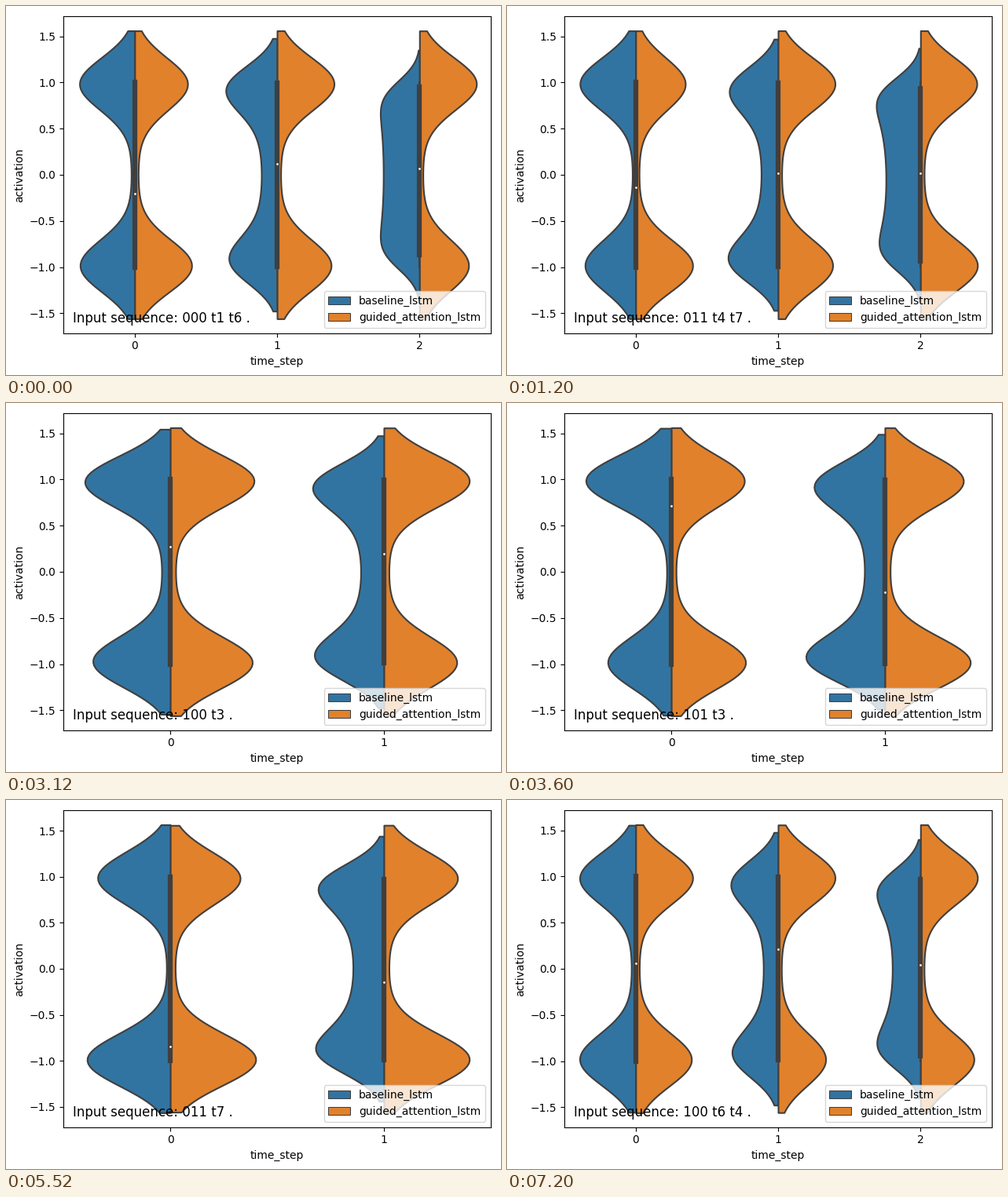
Write a matplotlib script that moves like this. It is 630 px wide and 470 px high and loops after 8 s.

```python
import numpy as np
import matplotlib.pyplot as plt
from matplotlib.animation import FuncAnimation
from matplotlib.patches import Patch

WIDTH, HEIGHT, DPI = 630, 470, 100
LEFT, RIGHT, TOP, BOTTOM = 73.2, 616.9, 13.2, 416.75
BLUE, ORANGE, GRAY = "#3274a1", "#e1812c", "#3f3f3f"
LINE = 1.5
FRAME_MS, SCENE_MS, LOOP_MS = 400, 1200, 8000
UNITS = 480
GUIDED_GAIN = 6.8

# Each time step: baseline gain, baseline tilt, guided tilt.
SCENES = [
    ("000 t1 t6", [(6.8, 0.01, -0.07), (1.4, 0.05, 0.05), (0.55, 0, 0.14)]),
    ("011 t4 t7", [(6.8, 0.09, -0.13), (1.3, -0.02, 0.04), (0.62, 0.05, -0.01)]),
    ("100 t3", [(4, 0.09, 0.02), (1.35, 0.02, 0.15)]),
    ("101 t3", [(6.8, 0.28, -0.015), (1.6, -0.09, -0.08)]),
    ("011 t7", [(9, -0.13, -0.19), (1, -0.03, -0.14)]),
    ("010 t8", [(6.8, -0.03, 0.045), (1, 0, 0.04)]),
    ("100 t6 t4", [(5.5, 0, 0.02), (1.4, 0.02, 0.17), (0.75, 0, 0.06)]),
]


def activations(gain, tilt):
    """Tanh outputs of logistic inputs; a high gain saturates them at -1 and 1."""
    u = (np.arange(UNITS) + 0.5) / UNITS
    return np.tanh(gain * (np.log(u / (1 - u)) + tilt))


def density(data):
    """Gaussian kernel estimate, cut two bandwidths beyond the data."""
    bandwidth = data.std(ddof=1) * len(data) ** -0.2
    y = np.linspace(data.min() - 2 * bandwidth, data.max() + 2 * bandwidth, 100)
    kernels = np.exp(-0.5 * ((y[:, None] - data) / bandwidth) ** 2)
    return y, kernels.mean(axis=1) / bandwidth


def draw_violin(x, base, guided):
    curves = [density(base), density(guided)]
    peak = max(width.max() for _, width in curves)
    for (y, width), side, color in zip(curves, (-1, 1), (BLUE, ORANGE)):
        ax.fill_betweenx(y, x, x + side * 0.4 * width / peak,
                         facecolor=color, edgecolor=GRAY, linewidth=LINE)

    both = np.concatenate([base, guided])
    low, median, high = np.percentile(both, [25, 50, 75])
    ax.plot([x, x], [both.min(), both.max()], color=GRAY, linewidth=LINE)
    ax.plot([x, x], [low, high], color=GRAY, linewidth=3 * LINE)
    ax.scatter(x, median, s=(2 * LINE) ** 2, color="white",
               edgecolor=GRAY, zorder=3)


fig = plt.figure(figsize=(WIDTH / DPI, HEIGHT / DPI), dpi=DPI)
ax = fig.add_axes([LEFT / WIDTH, 1 - BOTTOM / HEIGHT,
                   (RIGHT - LEFT) / WIDTH, (BOTTOM - TOP) / HEIGHT])


def draw(i):
    tokens, steps = SCENES[i * FRAME_MS // SCENE_MS]
    ax.clear()
    for x, (gain, base_tilt, guided_tilt) in enumerate(steps):
        draw_violin(x, activations(gain, base_tilt),
                    activations(GUIDED_GAIN, guided_tilt))
    ax.set_xlim(-0.5, len(steps) - 0.5)
    ax.set_xticks(range(len(steps)))
    ax.set_yticks(np.arange(-1.5, 1.6, 0.5))
    ax.set_xlabel("time_step")
    ax.set_ylabel("activation")
    ax.text(0.022, 0.035, f"Input sequence: {tokens} .", fontsize=12,
            transform=ax.transAxes)
    ax.legend(handles=[
        Patch(facecolor=color, edgecolor=GRAY, linewidth=LINE / 2, label=label)
        for color, label in ((BLUE, "baseline_lstm"), (ORANGE, "guided_attention_lstm"))
    ], loc="lower right")
    return []


anim = FuncAnimation(fig, draw, frames=LOOP_MS // FRAME_MS, interval=FRAME_MS,
                     init_func=lambda: draw(0), repeat=True, repeat_delay=0)
plt.show()
```
